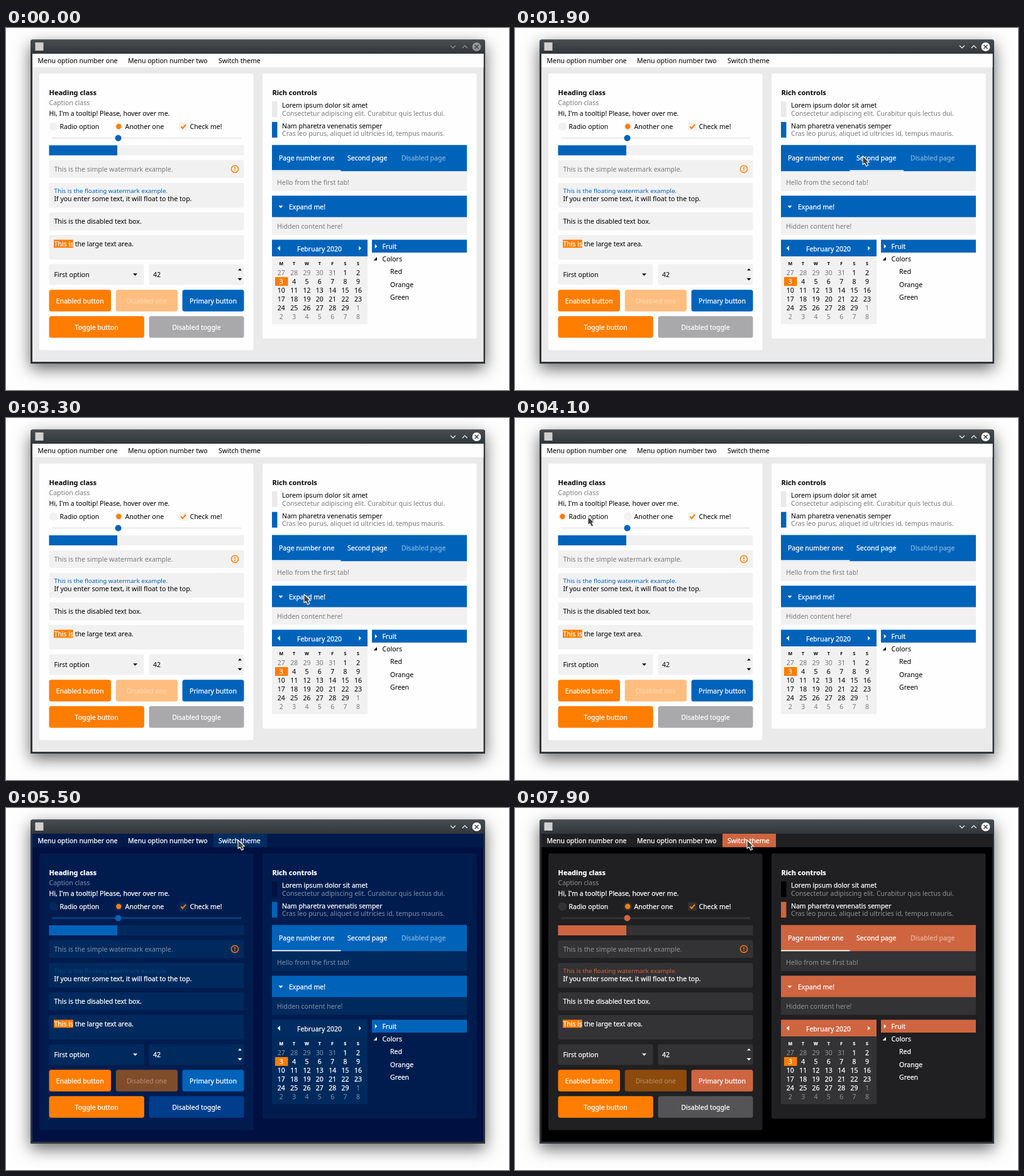
An HTML page for the animation above (8000 ms loop, 800 by 577 pixels).

```html
<!DOCTYPE html>
<html lang="en">
<head>
<meta charset="utf-8">
<title>Widget themes</title>
<style>
html, body { margin: 0; width: 100%; height: 100%; overflow: hidden; background: #fefefe; }
#shadow {
  position: absolute; left: 39px; top: 19px; width: 723px; height: 516px;
  border-radius: 4px 4px 0 0; box-shadow: 0 8px 26px rgba(0, 0, 0, .6);
}
svg {
  position: absolute; left: 0; top: 0; font: 10.5px "Noto Sans", "Open Sans", sans-serif;
  --orange: #ff7d00;
}
.light {
  --bar: #fefefe; --bg: #ebeaeb; --card: #fefefe; --ctl: #f2f1f2; --fg: #0a0a0a; --mute: #7c7b7c;
  --accent: #0063ba; --head: #0063ba; --float: #0063ba; --track: #f0eff0; --item: #ebeaeb;
  --off: #a9a8aa; --faded: #ffbe80; --fadedText: #ffdcb8; --weight: .05px;
}
.blue {
  --bar: #001a4b; --bg: #001040; --card: #001c4f; --ctl: #002a5d; --fg: #fff; --mute: #8090a9;
  --accent: #0063ba; --head: #002d61; --float: #00478c; --track: #003f80; --item: #001140;
  --off: #003d8b; --faded: #7f4d2a; --fadedText: #b69479; --weight: .25px;
}
.rust {
  --bar: #201f22; --bg: #000; --card: #201f22; --ctl: #333234; --fg: #fff; --mute: #929193;
  --accent: #ce6540; --head: #ce6540; --float: #ce6540; --track: #333234; --item: #000;
  --off: #545355; --faded: #8c4a0c; --fadedText: #bb9168; --weight: .25px;
}
text { fill: var(--fg); stroke: var(--fg); stroke-width: var(--weight); white-space: pre; }
.mute { fill: var(--mute); stroke: none; }
.white { fill: #fff; stroke: #fff; stroke-width: .25px; }
.bold { font-weight: 700; font-size: 11px; }
.mid { text-anchor: middle; }
.float { fill: var(--float); stroke: none; font-size: 9.75px; }
.faded { fill: var(--fadedText); stroke: none; }
.dim { opacity: .5; }
.week { font-weight: 700; font-size: 7px; }
</style>
</head>
<body>
<div id="shadow"></div>
<svg id="ui" class="light" width="800" height="577" viewBox="0 0 800 577"></svg>
<script>
const box = (x, y, w, h, fill, r = 0, attrs = '') =>
  `<rect x="${x}" y="${y}" width="${w}" height="${h}" rx="${r}" fill="${fill}" ${attrs}/>`;
const label = (x, y, s, cls = '', attrs = '') =>
  `<text x="${x}" y="${y}" class="${cls}" ${attrs}>${s}</text>`;
const dot = (x, y, r, fill, attrs = '') =>
  `<circle cx="${x}" cy="${y}" r="${r}" fill="${fill}" ${attrs}/>`;
const shape = (d, fill, attrs = '') => `<path d="${d}" fill="${fill}" ${attrs}/>`;
const v = name => `var(--${name})`;
const down = (x, y) => `M${x - 3.5} ${y - 1.7}h7l-3.5 3.6z`;
const up = (x, y) => `M${x - 3} ${y + 1.5}h6l-3-3.2z`;
const right = (x, y) => `M${x - 1.7} ${y - 3.5}v7l3.6-3.5z`;
const left = (x, y) => `M${x + 2} ${y - 4}v8l-4.3-4z`;
const button = (x, y, w, fill, s, cls = 'white') =>
  box(x, y, w, 34.5, fill, 3.5) + label(x + w / 2, y + 21.3, s, 'mid ' + cls);

function frame() {
  return `<defs><linearGradient id="title" x2="0" y2="1">
      <stop stop-color="#484d51"/><stop offset="1" stop-color="#31363b"/></linearGradient></defs>` +
    shape('M39 535V22q0-3.500 3.500-3.500h716q3.500 0 3.500 3.500v513z', '#31363b') +
    shape('M39 41V22q0-3.500 3.500-3.500h716q3.500 0 3.500 3.500v19z', 'url(#title)') +
    box(46.500, 23, 13, 13, '#d2d0ce') +
    `<g id="controls">` +
    shape('M707 28l4 4 4-4M725.800 32l4-4 4 4', 'none', 'stroke="#fcfcfc" stroke-width="1.1"') +
    dot(748.5, 30, 7, '#fcfcfc') +
    shape('M745.500 27l6 6m0-6l-6 6', 'none', 'stroke="#3a3f44" stroke-width="1.3"') + `</g>` +
    box(42, 41, 717.5, 491, v('bg')) + box(42, 41, 717.5, 21.5, v('bar')) +
    box(330, 41, 85, 21.5, v('head'), 0, 'id="hover"') +
    label(50.5, 55.5, 'Menu option number one') + label(194, 55.5, 'Menu option number two') +
    label(338, 55.5, 'Switch theme', '', 'id="switch"');
}

function leftCard() {
  const field = (y, h) => box(68.5, y, 310, h, v('ctl'), 3);
  return box(53, 72.5, 340.5, 441, v('card'), 3) +
    label(68.5, 106.8, 'Heading class', 'bold') +
    label(68.5, 123.3, 'Caption class', 'mute') +
    label(68.5, 139.5, 'Hi, I\'m a tooltip! Please, hover over me.') +
    dot(75.5, 157, 6.7, v('ctl')) + dot(179.3, 157, 6.7, v('ctl')) +
    dot(75.5, 157, 4.2, v('orange'), 'id="radio"') +
    label(85.5, 160.8, 'Radio option') + label(189.5, 160.8, 'Another one') +
    box(275.2, 150.3, 13.5, 13.5, v('ctl'), 2) +
    shape('M278.300 157l2.700 3 5-6', 'none', 'stroke="var(--orange)" stroke-width="2"') +
    label(292.5, 160.8, 'Check me!') +
    box(73, 174, 301, 3, v('track')) + dot(178.5, 175.5, 5, v('accent')) +
    box(68.5, 187, 310, 16, v('ctl')) + box(68.5, 187, 108.5, 16, v('accent')) +
    field(210.5, 28.5) + label(76.5, 228.5, 'This is the simple watermark example.', 'mute') +
    dot(364, 224.8, 5.6, 'none', 'stroke="var(--orange)" stroke-width="1.5"') +
    box(363.3, 221.5, 1.5, 4, v('orange')) + box(363.3, 226.6, 1.5, 1.5, v('orange')) +
    field(247, 39.5) + label(76.5, 263.3, 'This is the floating watermark example.', 'float') +
    label(76.5, 276, 'If you enter some text, it will float to the top.') +
    field(294, 28.5) + label(76.5, 312, 'This is the disabled text box.') +
    field(330, 39) + box(76, 337.5, 30.8, 12.8, v('orange')) +
    label(76.5, 347.8, '<tspan class="white">This is</tspan> the large text area.') +
    box(68.5, 376.5, 151, 33, v('ctl'), 3) + label(76.5, 397, 'First option') +
    shape(down(205.5, 393), v('fg')) +
    box(227.5, 376.5, 151, 33, v('ctl'), 3) + label(234, 397, '42') +
    shape(up(372, 385) + down(372, 400.5), v('fg')) +
    button(68.5, 417.3, 98.5, v('orange'), 'Enabled button') +
    button(174.7, 417.3, 98.3, v('faded'), 'Disabled one', 'faded') +
    button(280.5, 417.3, 98, v('accent'), 'Primary button') +
    button(68.5, 459.3, 151.3, v('orange'), 'Toggle button') +
    button(227.5, 459.3, 151, v('off'), 'Disabled toggle');
}

function calendar() {
  let out = box(423, 337.5, 152, 134.5, v('ctl')) + box(423, 337.5, 152, 26.5, v('head')) +
    shape(left(434, 351) + right(563, 351), '#fff') +
    label(498.5, 355.8, 'February 2020', 'mid white') + box(428, 397, 20.5, 14, v('orange'));
  for (let i = 0; i < 49; i++) {
    const x = 437.8 + i % 7 * 20.35, row = Math.floor(i / 7);
    if (!row) { out += label(x, 378.3, 'MTWTFSS'[i], 'mid week'); continue; }
    const date = new Date(2020, 0, 20 + i);
    const tone = date.getMonth() !== 1 ? 'mute' : date.getDate() === 3 ? 'white' : '';
    out += label(x, 380 + row * 14, date.getDate(), 'mid ' + tone);
  }
  return out;
}

function rightCard() {
  const item = (y, fill, title, note) => box(423, y, 8.5, 25, fill) +
    label(439, y + 10.2, title) + label(439, y + 22.5, note, 'mute');
  return box(408, 72.5, 340.5, 422.5, v('card'), 3, 'id="card"') +
    label(423.5, 106.8, 'Rich controls', 'bold') +
    item(117, v('item'), 'Lorem ipsum dolor sit amet',
      'Consectetur adipiscing elit. Curabitur quis lectus dui.') +
    item(149.7, v('accent'), 'Nam pharetra venenatis semper',
      'Cras leo purus, aliquet id ultricies id, tempus mauris.') +
    box(423, 186.5, 310, 42, v('accent')) + box(423, 226.5, 109.5, 2, '#fff', 0, 'id="line"') +
    label(434, 211, 'Page number one', 'white') + label(543, 211, 'Second page', 'white') +
    label(629, 211, 'Disabled page', 'white dim') +
    box(423, 228.5, 310, 31.5, v('ctl')) + label(431, 249.5, '', 'mute', 'id="page"') +
    box(423, 267.3, 310, 34.4, v('accent')) + shape('', '#fff', 'id="arrow"') +
    label(450, 288.8, 'Expand me!', 'white') +
    `<g id="hidden">` + box(423, 301.7, 310, 28, v('ctl')) +
    label(431, 319.8, 'Hidden content here!', 'mute') + `</g><g id="lower">` + calendar() +
    box(582, 337.5, 151, 20.5, v('accent')) + shape(right(588.5, 348), '#fff') +
    label(598.5, 352, 'Fruit', 'white') + shape('M590 365v5.500h-5.500z', v('fg')) +
    label(598.5, 372, 'Colors') + label(611, 392.3, 'Red') +
    label(611, 412.6, 'Orange') + label(611, 433, 'Green') + `</g>`;
}

const pointer = shape('M0 0V13.600L3.200 11.300 5.700 16.300 8.700 14.900 6.500 10H10.500z', '#3b4045',
  'id="pointer" stroke="#f4f4f4" stroke-width="1.1" stroke-linejoin="round"');
const ui = document.getElementById('ui');
ui.innerHTML = frame() + leftCard() + rightCard() + pointer;
const el = id => document.getElementById(id);
const parts = Object.fromEntries(['controls', 'hover', 'switch', 'radio', 'card', 'line', 'page',
  'arrow', 'hidden', 'lower', 'pointer'].map(id => [id, el(id)]));

// Pointer stops: time, x, y
const stops = [[0, 610, -20], [100, 610, -20], [1000, 572, 185], [1600, 553, 204], [2000, 553, 204],
  [2300, 476, 206], [2400, 476, 206], [2600, 474, 281], [3450, 474, 281], [3950, 116, 157],
  [4150, 116, 157], [4450, 214, 157], [4700, 214, 157], [5200, 369, 51], [8000, 369, 51]];

function pointerAt(t) {
  const i = stops.findIndex(s => s[0] > t);
  const [t0, x0, y0] = stops[i - 1], [t1, x1, y1] = stops[i];
  const k = (t - t0) / (t1 - t0), e = k * k * (3 - 2 * k);
  return [x0 + (x1 - x0) * e, y0 + (y1 - y0) * e];
}

const set = (part, attrs) => {
  for (const name in attrs) parts[part].setAttribute(name, attrs[name]);
};

function render(t) {
  const within = (a, b) => t >= a && t < b;
  const [x, y] = pointerAt(t);
  const second = within(1700, 2400), closed = within(2800, 3300), first = within(4000, 4600);
  const hover = x > 330 && x < 415 && y > 41 && y < 62;
  ui.setAttribute('class', t < 5500 ? 'light' : t < 7500 ? 'blue' : 'rust');
  set('pointer', { transform: `translate(${x} ${y})` });
  set('controls', { opacity: .45 + .55 * Math.min(1, Math.max(0, (t - 300) / 200)) });
  set('hover', { visibility: hover ? 'visible' : 'hidden' });
  set('switch', { class: hover ? 'white' : '' });
  set('radio', { cx: first ? 75.5 : 179.3 });
  set('line', { x: second ? 532.5 : 423, width: second ? 85.5 : 109.5 });
  parts.page.textContent = `Hello from the ${second ? 'second' : 'first'} tab!`;
  set('arrow', { d: closed ? right(437, 285.3) : down(437, 285) });
  set('hidden', { visibility: closed ? 'hidden' : 'visible' });
  set('lower', { transform: `translate(0 ${closed ? -28 : 0})` });
  set('card', { height: closed ? 394.5 : 422.5 });
}

function tick() {
  render((performance.now() + 10) % 8000);
  requestAnimationFrame(tick);
}
tick();
</script>
</body>
</html>
```
